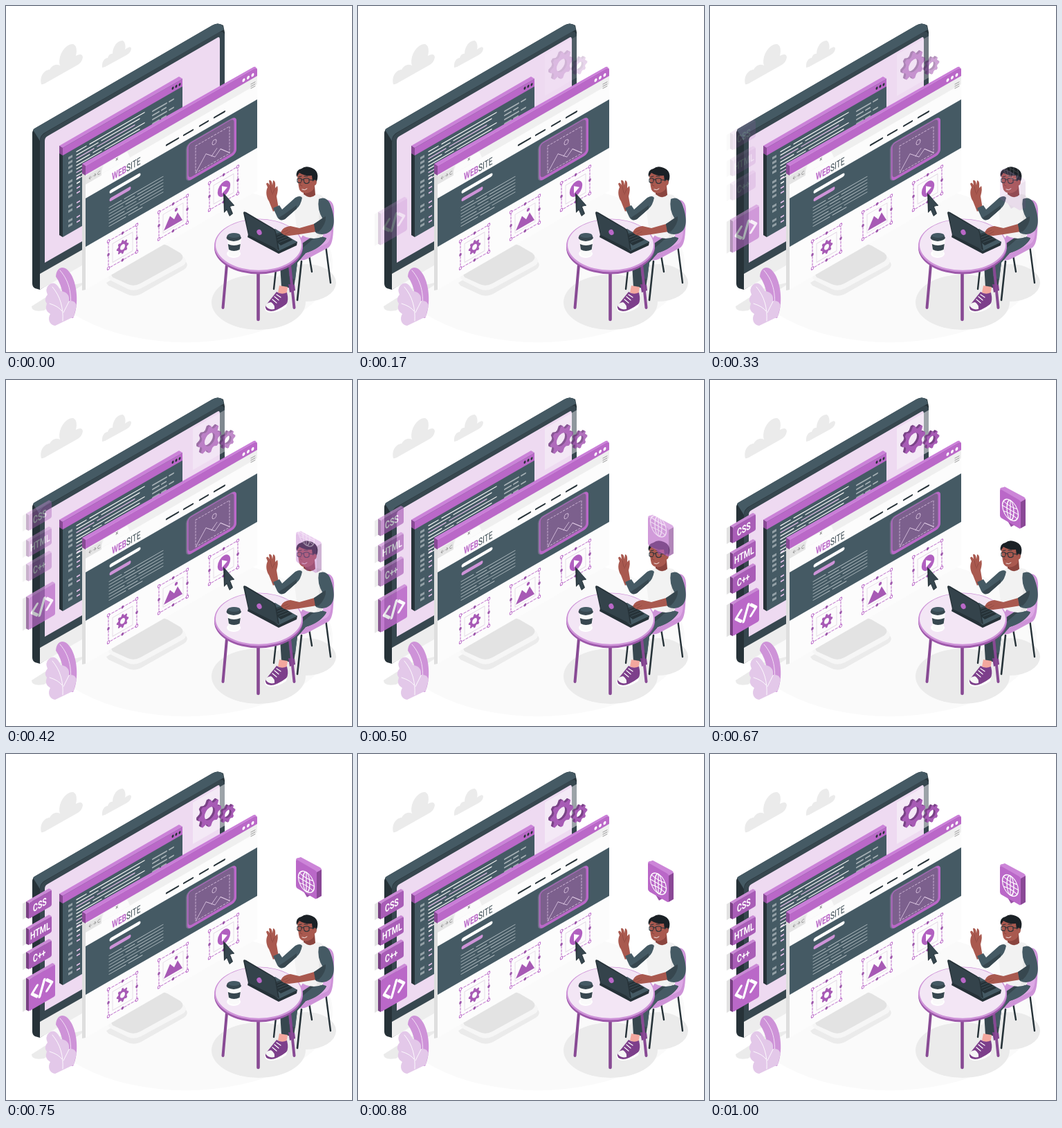
These frames come from a looping animation (500x500 px, 1.04 s). An HTML page with a canvas:

```html
<!DOCTYPE html>
<html lang="en">
<head>
<meta charset="utf-8">
<title>Website design</title>
<style>
html, body { margin: 0; width: 100%; height: 100%; overflow: hidden; background: #fff; }
canvas { display: block; width: 100vw; height: 100vh; }
</style>
</head>
<body>
<canvas id="stage"></canvas>
<script>
const LOOP = 1040, STEPS = 25, SLOPE = 0.577;
const PURPLE = '#ba68c8', DEEP = '#884a94', LILAC = '#ce93d8', SLATE = '#455a64', DARK = '#37474f',
      INK = '#263238', SKIN = '#a9594f', SHADE = '#8b453f', GREY = '#ebebeb';
const dpr = Math.max(1, window.devicePixelRatio || 1);
const stage = document.getElementById('stage');
const scene = document.createElement('canvas');
for (const c of [stage, scene]) c.width = c.height = 500 * dpr;
const view = stage.getContext('2d');
let g = scene.getContext('2d');
for (const c of [view, g]) { c.scale(dpr, dpr); c.lineCap = c.lineJoin = 'round'; }

// Basic helpers
function fill(d, color) { g.fillStyle = color; g.fill(new Path2D(d)); }
function line(d, color, w = 1, dash = []) {
  g.strokeStyle = color; g.lineWidth = w; g.setLineDash(dash);
  g.stroke(new Path2D(d)); g.setLineDash([]);
}
function oval(x, y, rx, ry, color, turn = 0) {
  g.fillStyle = color; g.beginPath(); g.ellipse(x, y, rx, ry, turn, 0, 7); g.fill();
}
function rect(x, y, w, h, color) { g.fillStyle = color; g.fillRect(x, y, w, h); }
function round(x, y, w, h, r, color) {
  g.fillStyle = color; g.beginPath(); g.roundRect(x, y, w, h, r); g.fill();
}
// Draw on an upright plane that recedes to the right (dir 1) or comes forward (dir -1)
function plane(x, y, draw, dir = 1) {
  g.save(); g.transform(1, -SLOPE * dir, 0, 1, x, y); draw(); g.restore();
}
function label(text, x, y, font, color) {
  const squeeze = 0.7;
  g.save(); g.translate(x, y); g.scale(squeeze, 1);
  g.font = font + ' Roboto, Inter, sans-serif'; g.fillStyle = color; g.fillText(text, 0, 0);
  const w = g.measureText(text).width * squeeze;
  g.restore();
  return w;
}
function gear(r, teeth, color, hole = 0.4) {
  g.fillStyle = color; g.beginPath();
  for (let i = 0; i < teeth * 4; i++) {
    const a = (i - 0.5) / (teeth * 4) * Math.PI * 2, q = i % 4 < 2 ? r : r * 0.77;
    g.lineTo(Math.cos(a) * q, Math.sin(a) * q);
  }
  g.closePath(); g.moveTo(r * hole, 0); g.arc(0, 0, r * hole, 0, 7); g.fill('evenodd');
}

function backdrop() {
  rect(0, 0, 500, 500, '#fff');
  oval(260, 372, 212, 114, '#fafafa');
  fill('M51 113C48 101 56 92 63 92Q69 82 78 86C74 72 86 54 97 55Q104 58 101 72Q110 67 111 74Q110 82 102 86L56 112Q52 114 51 113Z', GREY);
  fill('M139 89C138 80 143 75 147 75Q149 68 154 69C154 58 162 49 169 50Q174 54 172 63Q181 56 181 62Q180 68 174 71L143 88Z', GREY);
  fill('M37 434L78 408L118 398L55 440Q37 443 37 434Z', GREY);
  oval(365, 428, 68, 40, GREY);
  oval(434, 400, 43, 27, GREY);
}

function monitor() {
  fill('M145 400L215 356Q225 350 236 355L256 366Q267 374 257 381L197 415Q185 422 174 416L148 404Z', '#ebebeb');
  fill('M148 391L215 349Q224 345 233 349L256 362Q264 369 256 375L195 408Q185 413 176 409L150 396Z', '#f6f6f6');
  fill('M152 388L215 346Q224 342 233 346L252 357Q259 363 252 369L194 401Q185 406 176 402L154 392Z', '#e3e3e3');
  fill('M38 184Q38 179 43 176L298 28Q306 23 314 28L316 38V240L49 410L42 408Q38 406 38 401Z', INK);
  fill('M39 179Q40 177 43 176L298 28Q306 23 313 28L315 34L56 183Q49 187 49 195Z', SLATE);
  fill('M49 197Q49 188 57 183L306 39Q316 34 316 44V235L49 387Z', DARK);
  fill('M49 387L316 235V256L49 410Z', '#ededed');
  fill('M56 195Q56 190 60 188L305 46Q309 43 309 49V226L56 371Z', '#eedaf1');
}

function codeWindow() {
  fill('M77 202L82 205V334L77 331Z', INK);
  fill('M77 202L250 102L255 105L82 206Z', '#cb82d8');
  fill('M77 202L82 205V216L77 213Z', DEEP);
  plane(82, 205, () => {
    rect(0, 0, 173, 129, SLATE);
    rect(0, 0, 173, 11, PURPLE);
    for (let i = 0; i < 3; i++) oval(159 + i * 5, 5.5 + i * .2, 1.5, 2, INK);
    for (let i = 0; i < 15; i++) {
      if (i === 4 || i === 9 || i === 12) continue;
      const v = 18 + i * 7;
      rect(8, v, 6, 3.5, '#93a0a6');
      if (i > 4) rect(20, v + 2, 5, 2, i % 3 ? '#e1bee7' : '#f5f5f5');
    }
    for (let i = 0; i < 9; i++) {
      const v = 17 + i * 5, a = 14 + (i * 17) % 23;
      line(`M20 ${v}h${a}M${25 + a} ${v}H${118 - (i % 3) * 7}`, i % 4 === 2 ? '#e1bee7' : '#f5f5f5', 1.35);
    }
    for (let i = 0; i < 8; i++) {
      const v = 22 + i * 6;
      line(`M130 ${v}h${i % 2 ? 9 : 20}M${i % 2 ? 143 : 154} ${v}h6`, '#a7b1b6', 2);
    }
  });
}

function frameBox(u) {
  line(`M${u + 6} 135h29v27h-29Z`, '#e2d6e4', .8);
  line(`M${u} 128h41v39h-41Z`, PURPLE, 1, [3, 2]);
  for (const x of [0, 20.5, 41]) for (const y of [128, 147.5, 167]) {
    if (x === 20.5 && y === 147.5) continue;
    const mid = x === 20.5 || y === 147.5;
    if (mid) oval(u + x, y, 1.8, 2.1, '#9c56aa');
    else { oval(u + x, y, 2.2, 2.5, PURPLE); oval(u + x, y, 1.2, 1.4, '#fff'); }
  }
}

function siteWindow() {
  fill('M110 228L115 231V410L110 411Z', '#dedede');
  fill('M110 228L358 88Q362 87 363 92L115 235Z', '#ca7dd8');
  fill('M110 228L115 231V245L110 242Z', DEEP);
  plane(115, 231, () => {
    rect(0, 0, 248, 179, '#fcfcfc');
    round(0, 0, 248, 14, [0, 4, 0, 0], PURPLE);
    for (let i = 0; i < 3; i++) oval(228.5 + i * 6.5, 8, 2, 2.4, '#fff');
    rect(0, 13, 248, 12, '#efefef');
    fill('M22 25L26 14H58Q60 14 61 16L64 25Z', '#fbfbfb');
    rect(0, 15, 23, 12, '#e4e4e4');
    line('M9 21H5l2-2M5 21l2 2M11 21h4l-2-2M15 21l-2 2M21 20a2 2 0 1 0 0 3', '#999', .8);
    line('M44 15l2.5 3M46.5 15l-2.5 3', '#777', .8);
    line('M239 20h6M239 23h6M239 26h6', '#9a9a9a', 1);
    const w = label('WEB', 38, 43, 'bold 14.5px', PURPLE);
    label('SITE', 38 + w, 43, '14.5px', DARK);
    for (const [x, n] of [[117, 17], [142, 13], [165, 12], [186, 15]]) line(`M${x} 37.5h${n}`, INK, 2.3);

    rect(0, 47, 248, 70, SLATE);
    line('M37 58H77', '#fff', 5);
    line('M37 69.5H63', LILAC, 5);
    for (let i = 0; i < 7; i++) {
      const v = 80 + i * 4.5, a = 18 + (i * 19) % 36;
      line(`M34 ${v}h${a}M${38 + a} ${v}H${i === 6 ? 82 : 112}`, '#c3ccd0', .9);
    }
    round(145, 53, 73, 55, 7, '#77708d');
    round(147, 54, 71, 54, 6, PURPLE);
    round(148.5, 55, 66, 49, 5, '#7c608d');
    line('M159 63h49v39h-49Z', '#dfc4e5', .8, [2.5, 2]);
    line('M160 101L174 83L187 95L195 88L208 101M182 91L190 84', '#e3cde8', .8);
    g.beginPath(); g.ellipse(186, 73, 3, 3.4, 0, 0, 7); g.stroke();

    for (let i = 0; i < 3; i++) frameBox(33 + i * 73);
    g.save(); g.translate(53.5, 148); g.scale(.866, 1); gear(10, 8, '#a75ab5'); g.restore();
    fill('M113 159L122 143L128 151L133 144L140 159Z', '#a75ab5');
    oval(131, 139, 2.2, 2.4, '#a75ab5');
    oval(200, 148.5, 9.2, 10.5, '#b160c0');
    fill('M197 143L205 149L197 154Z', '#fff');
  });
  fill('M314 270L330 288L324 290L328 300L323 304L319 295L315 299Z', INK);
  fill('M317 273L330 289L323 289L327 301L322 302L319 293L316 297Z', DARK);
}

function plant() {
  fill('M72 391C73 376 85 374 92 385C103 399 106 432 97 451L80 448Q88 414 72 391Z', LILAC);
  line('M78 382C93 399 96 420 92 447', '#f7eaf9', .9);
  fill('M62 403C70 396 76 405 79 412C88 413 92 418 91 426Q101 425 102 434Q100 439 98 449L71 462C62 461 60 451 64 445Q55 440 59 430Q54 424 60 417Q56 409 62 403Z', '#e3c8e9');
  line('M67 406C79 420 83 437 82 455M63 430Q76 434 81 441M91 427L83 443', '#fff', .9);
}

function chairAndMan() {
  line('M391 372L387 409M438 360L442 384M462 346L469 400', INK, 2.4);
  fill('M462 280C472 279 475 289 474 301C473 322 474 343 466 349L438 364Q424 372 412 362L420 345Z', LILAC);
  fill('M466 283Q472 284 471 299C470 324 471 337 464 343L425 362L430 354L456 337Z', '#dda9e5');
  // Legs and shoes
  fill('M449 329L463 336Q456 349 433 357L421 371L416 408L398 406L396 374Q398 358 416 351Z', DARK);
  fill('M463 335Q456 350 433 357L421 370L418 396L409 390L408 370Q412 357 426 352L449 332Z', SLATE);
  line('M427 369L421 425', INK, 2.6);
  fill('M395 404L407 406L405 419L393 414Z', '#f3a79e');
  fill('M391 413Q398 418 406 414Q409 426 405 431Q391 441 383 441Q373 440 375 433Z', '#7d3f8b');
  fill('M375 433Q373 440 383 442Q395 440 406 430L405 435Q392 444 381 443Q371 441 375 433Z', '#fff');
  fill('M375 433Q376 429 383 428Q389 432 388 438Q379 440 375 433Z', '#f5f5f5');
  line('M385 424l6 5M388 420l6 5M391 417l6 4', '#fff', 1.2);
  fill('M408 402L417 403L418 411L410 414Z', '#7d3f8b');
  // Torso
  fill('M422 276Q429 270 440 270L455 273Q464 279 461 294L458 333Q440 341 421 327L417 297Z', '#f2f2f2');
  fill('M452 276L461 283L457 334L449 334Q454 310 452 276Z', '#e6e6e6');
  // Raised arm
  fill('M380 282C376 276 375 268 378 262L376 257Q378 253 381 259L380 252Q384 250 385 259L386 252Q390 252 389 263L392 260Q394 264 391 275L394 293L386 297Z', SKIN);
  line('M382 261l2 9M388 265l-3 7', SHADE, .7);
  fill('M386 292L395 288L399 294L418 277Q425 273 428 277Q426 288 420 293L403 308Q396 312 392 305Z', SLATE);
  fill('M402 301L420 288L420 293L403 308Q397 311 394 306Z', DARK);
  // Head
  fill('M430 262L446 260L447 273Q440 280 430 272Z', SHADE);
  fill('M421 246Q422 236 435 236Q449 237 448 253L445 264Q439 272 430 270Q424 269 423 261Z', SKIN);
  fill('M420 247Q418 237 427 235Q433 230 442 234Q452 238 450 250L447 259L443 253L442 245Q431 246 424 241Z', '#1b2126');
  oval(446, 255, 2.8, 3.7, SKIN);
  line('M421 250q4-2 6 0v4q-3 3-6 0ZM430 250q5-2 8 0v5q-4 3-7 0ZM427 251h3M438 251l7 1', INK, 1.1);
  line('M427 253l-2 6 3 1', SHADE, 1);
  line('M428 265q4 2 7-1', '#f5e6e4', 1);
  line('M423 247l4-1M431 246l5 0', INK, 1);
}

function table() {
  line('M319 374L313.5 436M410 374L416.5 436', DEEP, 4);
  line('M364.5 382V453', DEEP, 4.6);
  oval(365, 349, 64, 38.5, '#9d58aa');
  oval(365, 346, 64, 38.5, LILAC);
  oval(365, 345, 62, 36.8, '#f3e6f5');
  // Cup
  oval(329, 358, 10, 6, '#fff');
  fill('M320 337H340L337 360Q329 364 322 360Z', '#fafafa');
  fill('M320.8 344Q329 348 338.8 344L337.6 352Q329 356 322 352Z', DARK);
  fill('M318.5 335Q319 339 329 340Q339 339 340 335L338 331Q329 326 320 331Z', DARK);
  oval(329.5, 331.5, 9, 3.4, SLATE);
  // Laptop
  fill('M350 330L384 322L421 341L420 346L394 358L349 334Z', INK);
  fill('M361 329L389 322L421 341L394 354Z', SLATE);
  fill('M381 332L398 327L414 338L397 346Z', INK);
  for (let i = 0; i < 4; i++) line(`M${383 + i * 4} ${334 + i * 2.5}L${398 + i * 4} ${328 + i * 2.5}`, SLATE, .7);
  fill('M343 299Q343 296 347 298L386 321Q389 323 390 326L395 353L350 331Z', INK);
  fill('M345 299L385 322Q388 324 389 328L393 352L351 331Z', '#34434b');
  oval(366, 327, 3.5, 4.2, PURPLE, -.4);
}

function rightArm() {
  fill('M397 327Q400 319 411 318L424 321L452 313L455 325L424 330L409 332Q401 332 397 327Z', SKIN);
  line('M399 327l8-3M403 330l7-4', SHADE, .7);
  fill('M452 279Q462 274 468 285C474 300 477 317 469 325Q460 333 448 328L445 315L458 308Q449 294 452 279Z', SLATE);
  fill('M458 306L462 304Q463 315 452 326L447 327L445 315Z', DARK);
}

function badge(y, w, h, face, draw) {
  plane(24, y + 1, () => rect(0, 0, w, h, 'rgba(214,214,214,.7)'));
  fill(`M29 ${y - 2}L${29 + w} ${y - 2 - w * SLOPE}L${33 + w} ${y - w * SLOPE}L33 ${y}Z`, '#cb8ad6');
  fill(`M29 ${y - 2}L33 ${y}V${y + h}L29 ${y + h - 2}Z`, '#784083');
  plane(33, y, () => { round(0, 0, w, h, 2, face); draw(); });
}
function textBadge(text, y, u) {
  badge(y, 33, 23, '#a95db7', () => label(text, u, 16.8, 'bold 15px', '#fff'));
}
function codeBadge() {
  badge(327, 38, 46, PURPLE, () =>
    line('M12 15.5L4.5 23.5L12 31.5M22.5 13L15.5 34M26 15.5L33.5 23.5L26 31.5', '#fff', 3.8));
}
function gears() {
  plane(270, 70, () => rect(0, 0, 46, 60, 'rgba(250,248,251,.52)'));
  for (const [x, y, r] of [[294.5, 86, 19], [321, 86.5, 12]]) {
    for (let k = 3; k >= 0; k--) plane(x - k, y - k * .5, () => {
      g.scale(.866, 1); gear(r, 8, k ? '#7a4387' : '#a75bb5', .46);
    });
  }
}
function bubble() {
  fill('M419 162Q419 159 423 159L426 158L454 173Q456 174 456 177V214L449 218L445 180Z', '#cc85d8');
  fill('M449 180L456 176V214L449 218Z', '#8a4896');
  fill('M428 204L435 216L442 212Z', '#9a52a8');
  plane(419, 161, () => round(0, 0, 30, 41, 2.5, PURPLE), -1);
}
function globe() {
  plane(434, 190, () => {
    g.strokeStyle = '#fff'; g.lineWidth = 1.3;
    for (const rx of [11.5, 5]) { g.beginPath(); g.ellipse(0, 0, rx, 14, 0, 0, 7); g.stroke(); }
    line('M0 -14V14M-11.5 0H11.5M-9.5 -7Q0 -4 9.5 -7M-9.5 7Q0 4 9.5 7', '#fff', 1.2);
  }, -1);
}

const clamp = x => Math.min(1, Math.max(0, x));
const span = (t, a, b) => clamp((t - a) / (b - a));
const wave = p => (1 - Math.cos(Math.PI * p)) / 2;

// Group layer so that overlapping parts fade as one
const layer = document.createElement('canvas');
layer.width = layer.height = 500 * dpr;
const lg = layer.getContext('2d');
lg.scale(dpr, dpr); lg.lineCap = lg.lineJoin = 'round';
function show(alpha, dy, draw) {
  if (!alpha) return;
  g = lg;
  g.clearRect(0, 0, 500, 500);
  g.save(); g.translate(0, dy); draw(); g.restore();
  view.globalAlpha = alpha;
  view.drawImage(layer, 0, 0, 500, 500);
  view.globalAlpha = 1;
}

[backdrop, monitor, codeWindow, siteWindow, plant, chairAndMan, table, rightArm].forEach(part => part());

function render(t) {
  view.drawImage(scene, 0, 0, 500, 500);
  const first = span(t, 30, 570), next = span(t, 285, 610);
  const drop = (d, a, b) => -d * (1 - span(t, a, b)) ** 2;
  show(first, 0, gears);
  show(first, drop(41, 0, 900), codeBadge);
  show(next, drop(42, 250, 820), () => {
    textBadge('CSS', 216, 6);
    textBadge('HTML', 254, 2);
    textBadge('C++', 289, 6);
  });
  // The globe follows its bubble with a smaller swing
  const rise = 82 - 91 * wave(span(t, 260, 740)) + 9 * wave(span(t, 740, 1000));
  show(next, rise, bubble);
  show(next, rise * .58, globe);
}

const start = performance.now();
function tick() {
  const t = (performance.now() - start) % LOOP, hold = LOOP / STEPS;
  render(Math.floor((t + 4) / hold) % STEPS * hold);
  requestAnimationFrame(tick);
}
tick();
</script>
</body>
</html>
```
